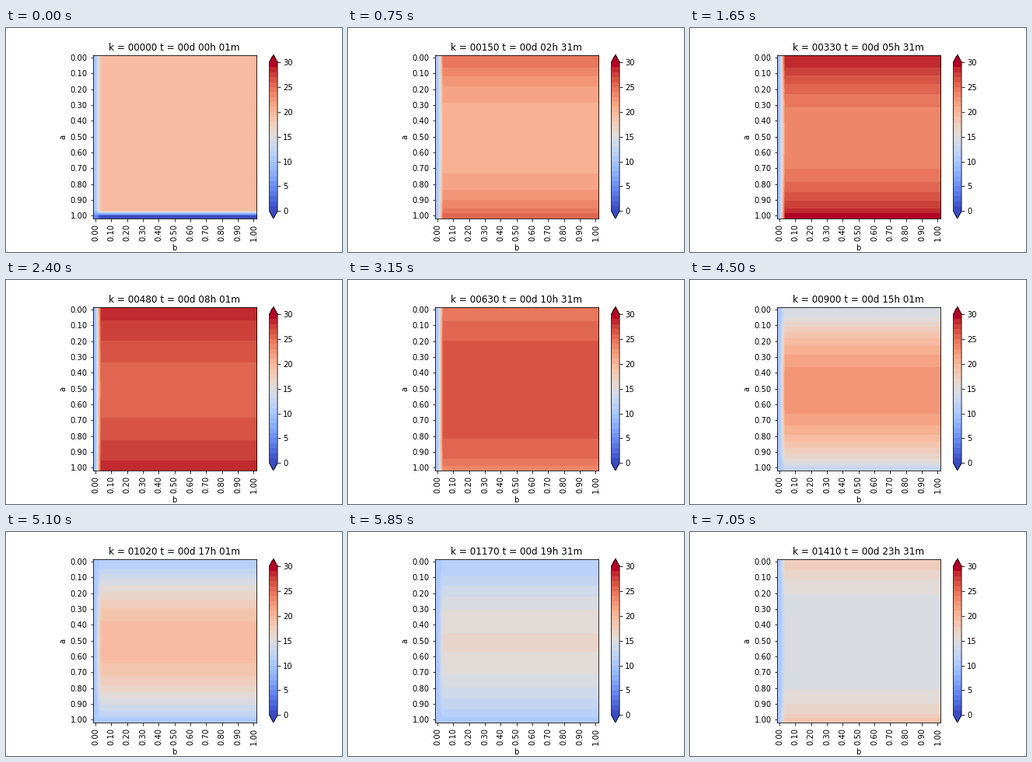
A matplotlib script for the animation above (7.2 s loop, 432 by 288 pixels).

```python
import numpy as np
import matplotlib.pyplot as plt
from matplotlib.animation import FuncAnimation

W, H, DPI = 432, 288, 72
FRAMES, INTERVAL = 48, 150
STEP = 30                 # simulated minutes per frame
N = 31                    # grid nodes per side
RATE = 0.318              # diffusion number per minute
TOP_GAP, BOTTOM_GAP = 1.3, 2.0   # contact resistance of the outer faces
MEAN, SWING, SIDE = 19.8, 10.0, 10.0

plt.rcParams.update({"font.family": "DejaVu Sans", "font.size": 10})


def ambient(minute):
    """Daily temperature wave."""
    return MEAN + SWING * np.sin(2 * np.pi * minute / 1440)


def simulate():
    """Temperature profile along a, one row per frame."""
    body = np.full(N - 2, MEAN)
    gaps = np.ones(N - 1)
    gaps[0], gaps[-1] = TOP_GAP, BOTTOM_GAP
    profiles = []
    for k in range(FRAMES * STEP):
        air = ambient(k)
        if k % STEP == 0:
            profiles.append(np.r_[body[0], body, air])
        flux = RATE * np.diff(np.r_[air, body, air]) / gaps
        body += np.diff(flux)
    return np.array(profiles)


def field(i):
    grid = np.repeat(profiles[i][:, None], N, axis=1)
    grid[:, 0] = SIDE
    if i == 0:            # lower edge is not set yet at the start
        grid[-1] = 0
        grid[-1, 0] = SIDE / 2
    return grid


def title(i):
    k = i * STEP
    hours, minutes = divmod(k + 1, 60)
    days, hours = divmod(hours, 24)
    return f"k = {k:05d} t = {days:02d}d {hours:02d}h {minutes:02d}m"


profiles = simulate()

fig = plt.figure(figsize=(W / DPI, H / DPI), dpi=DPI, facecolor="white")
fig.subplots_adjust(left=0.125, right=0.9, bottom=0.15, top=0.88)
ax = fig.add_subplot()

image = ax.imshow(field(0), cmap=plt.get_cmap("coolwarm", 30), vmin=0, vmax=30,
                  interpolation="bilinear", interpolation_stage="data")
ticks = np.arange(0, N, 3)
labels = [f"{t / (N - 1):.2f}" for t in ticks]
ax.set_xticks(ticks, labels, rotation=90)
ax.set_yticks(ticks, labels)
ax.set_xlabel("b")
ax.set_ylabel("a")
heading = ax.set_title(title(0), fontsize=12)
fig.colorbar(image, ax=ax, extend="both", ticks=range(0, 31, 5))


def update(i):
    image.set_data(field(i))
    heading.set_text(title(i))
    return image, heading


anim = FuncAnimation(fig, update, frames=FRAMES, interval=INTERVAL,
                     repeat=True, repeat_delay=0, blit=False)
plt.show()
```
